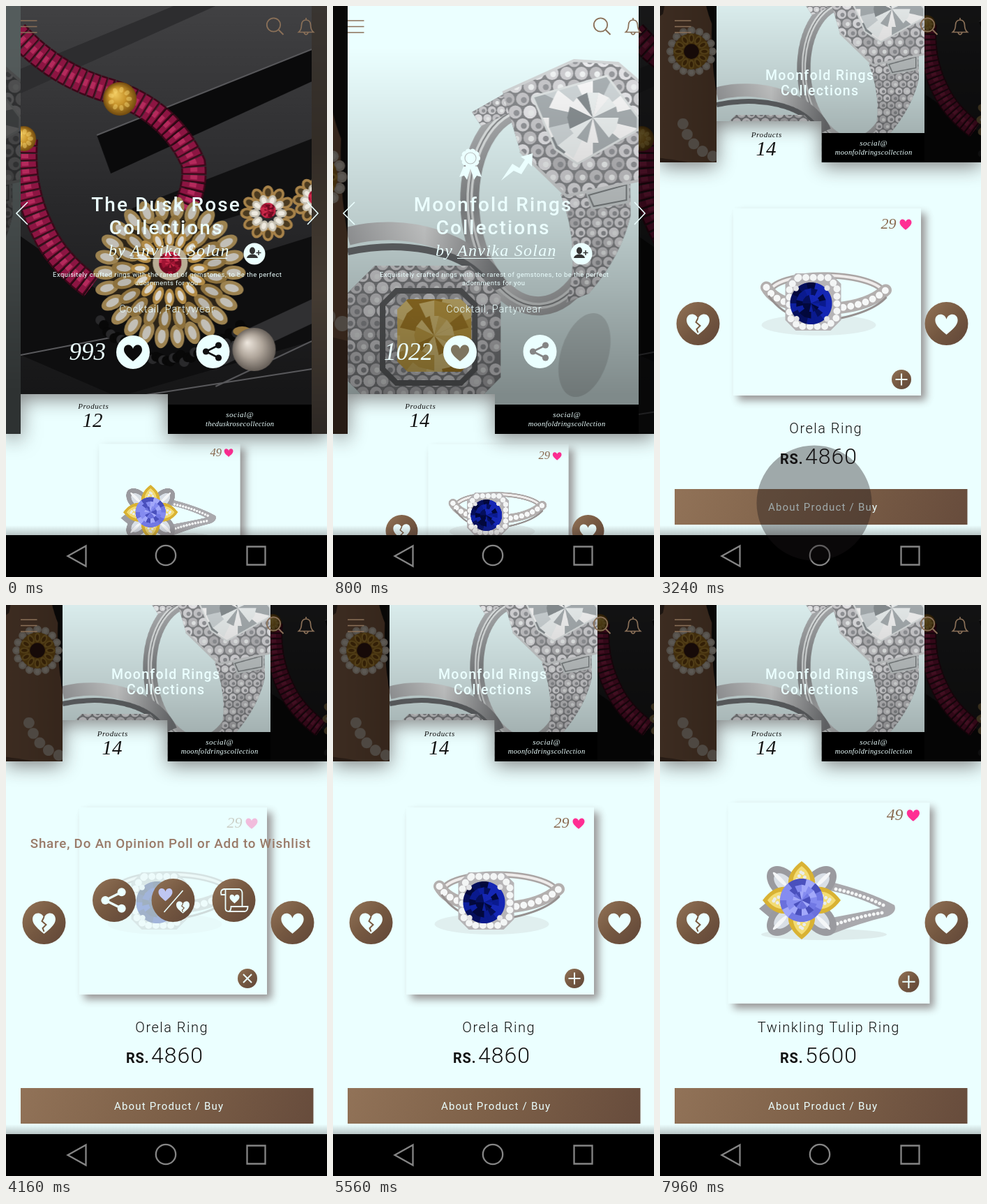
Recreate the animation shown at these times as an HTML page with a canvas. Size 460 by 818 pixels, loop 8 s.

```html
<!DOCTYPE html>
<html lang="en">
<head>
<meta charset="utf-8">
<title>Jewellery app</title>
<style>
html, body { margin: 0; width: 100%; height: 100%; overflow: hidden; background: #ebffff; }
canvas { display: block; width: 100vw; height: 100vh; }
</style>
</head>
<body>
<canvas id="stage"></canvas>
<script>
const W = 460, H = 818, LOOP = 8000, TAU = Math.PI * 2;
const MINT = '#ebffff', PINK = '#ff2e93', BROWN = '#8a7058';
const dpr = window.devicePixelRatio || 1;
const stage = document.getElementById('stage');
stage.width = W * dpr;
stage.height = H * dpr;
const screen2d = stage.getContext('2d');
let g = screen2d;

const clamp = x => Math.max(0, Math.min(1, x));
const lerp = (a, b, k) => a + (b - a) * k;
const prog = (t, a, b) => clamp((t - a) / (b - a));
const ease = x => x * x * (3 - 2 * x);
const span = (t, a, b) => ease(prog(t, a, b));
const hash = n => { const s = Math.sin(n * 127.1) * 43758.5; return s - Math.floor(s); };
const sans = (size, weight = 400) => `${weight} ${size}px Roboto, sans-serif`;
const serif = size => `italic ${size}px "Liberation Serif", serif`;

// ---- drawing helpers ----
function group(alpha, fn) {
  if (alpha <= 0.003) return;
  g.save();
  g.globalAlpha *= alpha;
  fn();
  g.restore();
}
function text(s, x, y, font, color, gap = 0, align = 'center') {
  g.font = font;
  g.fillStyle = color;
  g.letterSpacing = gap + 'px';
  g.textAlign = align;
  g.fillText(s, x + (align === 'center' ? gap / 2 : 0), y);
}
function disc(x, y, r, fill) {
  g.fillStyle = fill;
  g.beginPath();
  g.arc(x, y, r, 0, TAU);
  g.fill();
}
function oval(x, y, rx, ry, fill, rot = 0) {
  g.fillStyle = fill;
  g.beginPath();
  g.ellipse(x, y, rx, ry, rot, 0, TAU);
  g.fill();
}
function shade(x0, y0, x1, y1, ...colors) {
  const s = g.createLinearGradient(x0, y0, x1, y1);
  colors.forEach((c, i) => s.addColorStop(i / (colors.length - 1), c));
  return s;
}
function glow(x, y, r, ...colors) {
  const s = g.createRadialGradient(x - r * .3, y - r * .3, 0, x, y, r);
  colors.forEach((c, i) => s.addColorStop(i / (colors.length - 1), c));
  return s;
}
function fill(path, color) {
  g.fillStyle = color;
  g.fill(typeof path === 'string' ? new Path2D(path) : path);
}
function line(path, width, color, dash = [], cap = 'butt') {
  g.lineWidth = width;
  g.strokeStyle = color;
  g.lineCap = cap;
  g.setLineDash(dash);
  g.stroke(typeof path === 'string' ? new Path2D(path) : path);
  g.setLineDash([]);
}
const dots = (path, size, gap, color) => line(path, size, color, [0, gap], 'round');
function chamfer(x, y, rx, ry, c) {
  return new Path2D(`M${x - rx + c} ${y - ry}H${x + rx - c}L${x + rx} ${y - ry + c}V${y + ry - c}` +
    `L${x + rx - c} ${y + ry}H${x - rx + c}L${x - rx} ${y + ry - c}V${y - ry + c}Z`);
}
// small round stones filling a shape
function pave(path, x0, y0, x1, y1, step) {
  g.save();
  fill(path, '#8b8d90');
  g.clip(typeof path === 'string' ? new Path2D(path) : path);
  let row = 0;
  for (let y = y0; y < y1; y += step * .88, row++)
    for (let x = x0 + (row % 2) * step / 2; x < x1; x += step) {
      const v = 190 + hash(x * 3 + y * 7) * 50 | 0;
      disc(x, y, step * .45, `rgb(${v},${v},${v + 3})`);
      disc(x + step * .08, y + step * .06, step * .2, hash(x + y) > .5 ? '#9b9da1' : '#f5f8f8');
    }
  g.restore();
}
// faceted stone: hashed wedges clipped to a shape
function gem(path, x, y, r, colors) {
  g.save();
  fill(path, colors[0]);
  g.clip(path);
  for (let ring = 0; ring < 3; ring++) {
    const rr = r * (1 - ring * .3);
    for (let i = 0; i < 14; i++) {
      const a = (i + ring * .5) * TAU / 14;
      g.fillStyle = colors[hash(i * 3 + ring * 17 + r) * colors.length | 0];
      g.beginPath();
      g.moveTo(x, y);
      g.lineTo(x + Math.cos(a) * rr, y + Math.sin(a) * rr);
      g.lineTo(x + Math.cos(a + .46) * rr, y + Math.sin(a + .46) * rr);
      g.fill();
    }
  }
  g.restore();
}
function round(x, y, r) {
  const p = new Path2D();
  p.arc(x, y, r, 0, TAU);
  return p;
}
function petals(x, y, n, dist, len, wide, color, core, turn = 0) {
  for (let i = 0; i < n; i++) {
    g.save();
    g.translate(x, y);
    g.rotate(turn + i * TAU / n);
    oval(dist, 0, len, wide, color);
    if (core) oval(dist, 0, len * .6, wide * .55, core);
    g.restore();
  }
}
function sprite(w, h, k, x, y, paint) {
  const c = document.createElement('canvas');
  c.width = w * k;
  c.height = h * k;
  g = c.getContext('2d');
  g.scale(k, k);
  g.translate(-x, -y);
  paint();
  g = screen2d;
  return c;
}

// ---- slide pictures ----
function earPicture() {
  g.fillStyle = shade(21, 0, 438, 0, '#a9805f', '#b98a69', '#94694c');
  g.fillRect(21, 0, 417, 614);
  fill('M405 0H438V330Q425 260 428 190Q400 120 405 0Z', '#191513');
  fill('M300 0H400Q350 60 330 170L300 190Z', '#4d3a2e');
  fill('M21 470Q250 430 438 480V614H21Z', '#6d4c38');
  petals(387, 245, 16, 42, 8, 8, '#e9dccb', '#fff6e6');
  disc(387, 245, 36, '#b57d21');
  petals(387, 245, 12, 26, 10, 6, '#dfa93f', '#8c5714');
  disc(387, 245, 15, '#3c1c17');
  dots('M370 390Q385 440 430 455', 22, 23, '#d8c8b8');
}
function eternityPicture() {
  g.fillStyle = MINT;
  g.fillRect(21, 0, 417, 614);
  oval(360, 500, 34, 62, 'rgba(120,120,120,.25)', .3);
  const hoop = new Path2D();
  hoop.ellipse(287, 288, 91, 142, -.08, 0, TAU);
  line(hoop, 27, shade(180, 150, 380, 440, '#c5c7c9', '#8e9193', '#d9dbdc', '#9c9ea0'));
  line(hoop, 9, '#e8ecec');
  line(hoop, 2, '#8e9193');
  pave('M199 152L262 116L285 138L212 172Z', 195, 115, 290, 175, 13);
  pave('M326 270L425 236L426 300Q412 360 366 412L334 425Q356 350 326 270Z', 322, 240, 430, 430, 16);
  fill('M362 268L424 250V282L370 292Z', '#cfd5d6');
  line('M366 271L420 256V278L373 287Z', 2, '#7f8486');
  pave('M243 124L345 78L408 82L438 108V250L334 272L268 208Z', 240, 78, 440, 275, 21);
  line('M243 124L345 78L408 82L438 108M268 208L334 272L438 250', 4, '#d6d9da');
  const stone = new Path2D('M286 130L392 100L446 172L350 226L318 205Z');
  gem(stone, 372, 160, 92, ['#f4f9f9', '#d5dcde', '#aeb5b8', '#ffffff', '#8d9497']);
  line(stone, 3, '#e5eaea');
  line('M21 330C100 308 205 335 238 405', 26, shade(21, 0, 240, 0, '#b4b6b8', '#eceeee', '#85878a'));
  line('M21 352C100 335 180 350 215 390', 10, '#707376');
  pave(chamfer(128, 474, 112, 102, 44), 14, 370, 242, 580, 19);
  line(chamfer(137, 474, 66, 66, 20), 8, '#66686a');
  gem(chamfer(145, 472, 53, 52, 15), 145, 472, 72, ['#d7b04c', '#f0d583', '#b78b2c', '#e3c266']);
  g.fillStyle = shade(0, 60, 0, 556, 'rgba(0,0,0,0)', 'rgba(0,0,0,.2)', 'rgba(0,0,0,.46)');
  g.fillRect(21, 0, 417, 614);
}
function rubyPicture() {
  g.fillStyle = shade(0, 0, 0, 560, '#414143', '#29292b', '#161617');
  g.fillRect(21, 0, 417, 614);
  fill('M130 185L438 62V108L150 240Z', '#0a0a0b');
  fill('M21 90L240 0H300L21 125Z', '#2d2d2f');
  fill('M180 290L438 190V268L200 340Z', '#101011');
  fill('M21 330L150 420L438 330V480L160 560L21 500Z', '#0e0e0f');
  fill('M330 470L438 420V455L300 520Z', '#303032');
  line('M130 185L438 62M21 500L150 475M300 545L438 480M21 585L438 520', 2, '#59595c');
  const strands = 'M14 38Q70 100 150 122Q235 150 268 225Q275 275 232 325M28 190Q22 260 52 320Q72 365 122 402';
  line(strands, 36, '#3d0719', [10, 1]);
  line(strands, 31, '#8c1542', [8, 3]);
  line(strands, 10, '#b52a5c', [6, 5]);
  for (const [x, y, r] of [[163, 133, 24], [25, 190, 18]]) {
    disc(x, y, r, glow(x, y, r, '#f3cd62', '#c8942c', '#714a0e'));
    petals(x, y, 9, r * .55, 4, 3, 'rgba(250,220,120,.45)');
  }
  for (let i = 0; i < 42; i++)
    disc(135 + i * 5, 450 + Math.sin(i * .075) * 50 + hash(i) * 12, 7, i % 3 ? '#080808' : '#29292b');
  disc(234, 382, 92, '#2c2418');
  petals(234, 382, 26, 92, 17, 10, '#9c8250', '#c2bfb7');
  petals(234, 382, 20, 66, 17, 9, '#8d713d', '#b9b6ae', .1);
  petals(234, 376, 16, 42, 13, 7, '#b18a45', '#d9d6cf');
  disc(235, 368, 25, '#b9ad94');
  gem(round(235, 368, 16), 235, 368, 18, ['#a01433', '#c92a4a', '#730b22']);
  for (const [x, y, r] of [[375, 297, 1], [444, 278, .8]]) {
    petals(x, y, 12, 30 * r, 10, 8, '#a8834a', '#4a3a20');
    petals(x, y, 10, 19 * r, 8, 6, '#c7c1b2', '#eeeae0');
    gem(round(x, y - 4, 11), x, y - 4, 13, ['#9e1231', '#c92a4a', '#6f0a20']);
  }
  oval(338, 466, 13, 7, '#9a7a40');
  disc(355, 492, 31, glow(355, 492, 33, '#efe8df', '#b1a79c', '#5d5650'));
}
function lastPicture() {
  g.fillStyle = shade(21, 0, 21, 614, '#a09488', '#8d7a69', '#c0a68d', '#7d6f64');
  g.fillRect(21, 0, 417, 614);
}
const slides = [earPicture, eternityPicture, rubyPicture, lastPicture]
  .map(p => sprite(417, 614, 1, 21, 0, p));

// ---- rings, in the coordinates of the open card ----
function blueRing() {
  oval(228, 458, 82, 15, 'rgba(130,100,100,.10)');
  const back = new Path2D();
  back.ellipse(240, 413, 82, 26, .02, Math.PI, TAU);
  line(back, 9, '#aaa5a4');
  line(back, 4, '#efeceb');
  const arms = 'M153 404Q163 422 190 428M252 434Q300 430 324 408';
  line(arms, 17, '#b3afae', [], 'round');
  dots(arms, 10, 11, '#f6f8f8');
  line('M156 416Q175 442 200 447M250 450Q305 440 325 418', 3, '#96908f');
  fill(chamfer(220, 425, 40, 41, 15), '#b6b4b6');
  dots(chamfer(220, 425, 34, 35, 13), 10, 10.6, '#f3f5f5');
  gem(round(217, 427, 30), 217, 427, 31, ['#0a1a8e', '#1527b5', '#050f5c', '#0d1f9f', '#02083c']);
  for (const a of [.8, 2.35, 3.9, 5.5]) disc(218 + Math.cos(a) * 31, 427 + Math.sin(a) * 31, 4, '#e4e4e6');
}
function lotusRing() {
  oval(235, 472, 90, 8, 'rgba(130,100,100,.12)');
  fill('M238 395Q300 410 336 430Q340 440 326 446Q285 456 245 472L235 450Q290 440 316 434Q280 416 238 408Z', '#a9a9ad');
  dots('M252 407Q290 415 322 431M318 441Q285 446 250 458', 5, 6, '#f4f6f6');
  fill('M160 420L142 435L166 455Z', '#9d9da2');
  petals(203, 424, 4, 36, 29, 19, '#9a9a9f', '#d9dfe6', Math.PI / 4);
  petals(203, 424, 4, 44, 14, 3, '#f4f6f8', '', Math.PI / 4);
  for (let i = 0; i < 4; i++) {
    g.save();
    g.translate(203, 423);
    g.rotate(i * TAU / 4);
    fill('M56 0Q38 -24 16 -18V18Q38 24 56 0Z', '#d9b233');
    fill('M49 0Q38 -15 20 -12V12Q38 15 49 0Z', '#f3dc74');
    dots('M24 -9L42 0L24 9', 5, 6, '#e9ecec');
    g.restore();
  }
  gem(round(203, 423, 31), 203, 423, 32, ['#6a70dc', '#858cf0', '#4a50bd', '#7178e4', '#a2a8fa']);
}
const blue = { ring: sprite(270, 270, 2, 105, 290, blueRing), count: '29', dy: 0, name: 'Orela Ring', price: '4860', nameX: 237 };
const lotus = { ring: sprite(290, 290, 2, 97, 282, lotusRing), count: '49', dy: -6, name: 'Twinkling Tulip Ring', price: '5600', nameX: 241 };

// ---- icons ----
function heartPath(x, y, w) {
  const h = w / 2, p = new Path2D();
  p.moveTo(x, y + h * .92);
  p.bezierCurveTo(x - h * .5, y + h * .5, x - h, y + h * .1, x - h, y - h * .35);
  p.bezierCurveTo(x - h, y - h * 1.05, x - h * .15, y - h * 1.05, x, y - h * .45);
  p.bezierCurveTo(x + h * .15, y - h * 1.05, x + h, y - h * 1.05, x + h, y - h * .35);
  p.bezierCurveTo(x + h, y + h * .1, x + h * .5, y + h * .5, x, y + h * .92);
  return p;
}
function crackedHeart(x, y, w) {
  const k = w / 33;
  fill(heartPath(x, y, w), MINT);
  line(`M${x} ${y - 9 * k}l${-3 * k} ${6 * k}l${6 * k} ${5 * k}l${-5 * k} ${5 * k}l${2 * k} ${5 * k}`, 2 * k, '#78593f');
}
const brownDisc = (x, y, r) => disc(x, y, r, shade(x - r, y - r, x + r, y + r, '#927357', '#755841', '#604638'));
function share(x, y, k, color) {
  g.save();
  g.translate(x, y);
  g.scale(k, k);
  line('M9 -9L-9 0L9 9', 2.6, color);
  disc(-9, 0, 4.6, color);
  disc(9, -9, 4.6, color);
  disc(9, 9, 4.6, color);
  g.restore();
}
function topIcons() {
  line('M21 21H44.500M21 29.500H44.500M21 38H44.500', 1.7, BROWN);
  line(round(383.5, 27, 9.7), 1.8, BROWN);
  line('M390.500 34L397.500 41', 2, BROWN);
  line('M419.500 37.500H440.500Q436.500 34 436.500 27Q436 20 430 20Q424 20 423.500 27Q423.500 34 419.500 37.500ZM427 38Q430 44 433 38M430 17V20', 1.7, BROWN);
}
function navBar() {
  g.fillStyle = shade(0, 744, 0, 758, 'rgba(60,50,50,0)', 'rgba(60,50,50,.28)');
  g.fillRect(0, 744, W, 14);
  g.fillStyle = '#000';
  g.fillRect(0, 758, W, 60);
  line('M88.500 788L114.500 773.500V802.500Z', 2.3, '#858585');
  line(round(229, 787, 14.2), 2.3, '#858585');
  line('M345.500 774.500H371.500V800.500H345.500Z', 2.3, '#858585');
}

// ---- hero ----
const info = {
  1: { title: 'Moonfold Rings', likes: '1022', count: '14', tag: 'moonfoldringscollection', hole: '#7d745f', node: '#858585' },
  2: { title: 'The Dusk Rose', likes: '993', count: '12', tag: 'theduskrosecollection', hole: '#0c0c0d', node: '#101012' }
};
function heroDetails(d, awards) {
  if (awards) {
    petals(197, 218, 10, 10, 4, 4, MINT);
    disc(197, 218, 11, MINT);
    line(round(197, 218, 8), 1.2, '#b9bfbf');
    fill('M187 230L181 245L188 243L192 249L197 233L202 249L206 243L213 245L207 230Z', MINT);
    fill('M241 250L257 226L267 232L275 220L269 216L286 211L285 230L280 225L270 241L259 236Z', MINT);
  }
  text('by', 147, 358, serif(24), MINT, 1.2, 'left');
  text('Anvika Solan', 178, 358, serif(24), MINT, 1.3, 'left');
  line('M178 361.500H317', 1, MINT);
  disc(356, 355, 15.5, MINT);
  oval(353, 350.5, 4, 5, '#333');
  fill('M345 361Q346 356 353 355.500Q360 356 361 361Z', '#333');
  line('M362 350V357M358.500 353.500H365.500', 1.5, '#333');
  text('Exquisitely crafted rings with the rarest of gemstones, to be the perfect', 231, 388, sans(9.5), MINT, .42);
  text('adornments for you', 230, 400, sans(9.5), MINT, .42);
  text('Cocktail, Partywear', 230.5, 439, sans(14.5, 300), MINT, .8);
  text(d.likes, 143, 507, serif(35), MINT, 0, 'right');
  disc(182, 496, 24, MINT);
  fill(heartPath(182, 497, 26), d.hole);
  disc(296.5, 495, 24, MINT);
  share(295.5, 495, 1, d.node);
}
function hero(pos, q) {
  const x = lerp(21, 81, q), w = lerp(417, 298, q), k = w / 417;
  const bottom = lerp(613, 224, q), top = lerp(0, -110, q);
  const split = x + w * .506, tab = lerp(57, 59, q);
  const shape = new Path2D();
  shape.rect(0, 0, W, bottom - tab);
  shape.rect(0, bottom - tab, x, tab);
  shape.rect(split, bottom - tab, W - split, tab);
  g.save();
  g.shadowColor = 'rgba(40,25,25,.55)';
  g.shadowBlur = 28 * dpr;
  g.shadowOffsetY = 6 * dpr;
  fill(shape, '#000');
  g.restore();
  g.save();
  g.clip(shape);
  slides.forEach((s, i) => {
    const sx = x + w * (i - pos);
    g.drawImage(s, sx, top, w + .5, 614 * k);
    g.fillStyle = `rgba(0,0,0,${.64 * clamp(Math.abs(i - pos))})`;
    g.fillRect(sx, 0, w + .5, bottom);
  });
  g.fillStyle = '#000';
  g.fillRect(split, bottom - 42, x + w - split, 42);
  g.restore();

  for (const i of [1, 2]) {
    const d = info[i], near = clamp(1 - Math.abs(i - pos) * 1.4);
    group(near, () => {
      const rx = lerp(335, 306, q);
      text(d.count, lerp(124, 152, q), bottom - 10, serif(29), '#111');
      text('social@', rx, bottom - 24, serif(11), MINT, .5);
      text(d.tag, rx, bottom - 11, serif(10.5), MINT, .35);
      g.translate(w * (i - pos), 0);
      const size = lerp(28, 19.5, q), gap = lerp(2.1, 1.3, q);
      text(d.title, 228.500, lerp(294, 106, q), sans(size, 500), MINT, gap);
      text('Collections', 228.500, lerp(327, 128, q), sans(size, 500), MINT, gap);
      group(clamp(1 - q * 2), () => heroDetails(d, i === 1));
    });
  }
  text('Products', lerp(125, 152.5, q), bottom - 36, serif(11), '#111', .6);
  group(1 - q, () => line('M31 281L15 297L31 313M432 281L447 297L432 313', 1.6, MINT));
}

// ---- product card ----
function card(p, x, y, size, alpha, veil = 0, angle = 0) {
  group(alpha, () => {
    g.translate(x, y);
    g.rotate(angle);
    g.scale(size / 270, size / 270);
    g.save();
    g.shadowColor = 'rgba(70,45,45,.5)';
    g.shadowBlur = 11 * dpr;
    g.shadowOffsetX = g.shadowOffsetY = 7 * dpr;
    g.fillStyle = MINT;
    g.fillRect(-134.5, -134, 269, 268);
    g.restore();
    g.drawImage(p.ring, -135, -135, 270, 270);
    text(p.count, 99, -105 + p.dy, serif(22), '#8a6a50', 0, 'right');
    fill(heartPath(112.5, -111 + p.dy, 17), PINK);
    g.fillStyle = `rgba(235,255,255,${.68 * veil})`;
    g.fillRect(-134.5, -134, 269, 268);
    g.translate(106.5, 111 + p.dy);
    brownDisc(0, 0, 14);
    g.rotate(veil * Math.PI / 4);
    line('M-8.500 0H8.500M0 -8.500V8.500', 2, MINT);
  });
}
function sideButtons(q, alpha, pink) {
  group(alpha, () => {
    const y = lerp(752, 455, q), r = lerp(23, 31, q);
    const lx = lerp(98.5, 54.5, q), rx = lerp(365.5, 410.5, q);
    brownDisc(lx, y, r);
    crackedHeart(lx, y + 1, r * 1.06);
    group(pink, () => {
      g.shadowColor = PINK;
      g.shadowBlur = 16 * dpr;
      disc(rx, y, r + 5, PINK);
    });
    brownDisc(rx, y, r);
    fill(heartPath(rx, y + 1, r * 1.04), MINT);
  });
}
function productInfo(q, first, second) {
  group(q, () => {
    g.translate(0, (1 - q) * 240);
    for (const [p, a] of [[blue, first], [lotus, second]])
      group(a, () => {
        text(p.name, p.nameX, 612, sans(20, 300), '#111', 1.5);
        text(p.price, 208, 656, sans(32, 300), '#111', 1, 'left');
      });
    text('RS.', 172, 656, sans(20, 700), '#111', .8, 'left');
    g.fillStyle = shade(21, 640, 440, 795, '#937459', '#7d6048', '#654a3b');
    g.fillRect(21, 692, 419.5, 51);
    text('About Product / Buy', 233, 723, sans(15), MINT, 1.2);
  });
}
function pollMenu(o) {
  group(o, () => text('Share, Do An Opinion Poll or Add to Wishlist', 235.5, 348, sans(18.8, 500), '#997a68', .8));
  [155, 239.5, 326.5].forEach((x, i) => {
    const k = ease(clamp(o * 1.4 - i * .2));
    group(k, () => {
      g.translate(x, 423);
      g.scale(k, k);
      brownDisc(0, 0, 31);
      if (i === 0) share(-1, 0, 1.3, MINT);
      if (i === 1) {
        fill(heartPath(-11, -8, 20), '#bfc6f2');
        crackedHeart(14, 10, 19);
        line('M-13 17L14 -14', 1.6, MINT);
      }
      if (i === 2) {
        line('M-12 -8H-18Q-20 -15 -14 -16H8Q12 -15 12 -10V9M-12 -15V12Q-12 16 -7 16H16Q20 15 20 9H-4Q-4 16 -8 16', 1.8, MINT);
        fill(heartPath(1, -2, 14), MINT);
      }
    });
  });
}
function touch(x, y, r, alpha) {
  group(alpha, () => disc(x, y, r, '#1c181a'));
}
function ripple(t, start, length, x, y, size, peak) {
  const u = prog(t, start, start + length);
  if (u > 0 && u < 1) touch(x, y, size * (1 - (1 - u) ** 4), peak * (1 - u ** 3));
}

function draw(t) {
  g.setTransform(dpr, 0, 0, dpr, 0, 0);
  g.fillStyle = MINT;
  g.fillRect(0, 0, W, H);

  const pos = 2 - span(t, 0, 800);
  const q = span(t, 2840, 3220);
  const menu = span(t, 3680, 4140) - span(t, 4960, 5540);
  const dx = 417 * prog(t, 6560, 7280) ** 1.6;
  const next = span(t, 6480, 6800);

  card(lotus, 234.5, 728, 203, clamp((pos - 1) * 2 - 1));
  card(lotus, 242, 427, lerp(255, 290, next), next);
  productInfo(q, 1 - span(t, 6480, 6760), span(t, 7320, 7920));
  card(blue, lerp(237, 239.5, q) + dx, lerp(728, 424, q), lerp(202, 270, q),
    t < 7280 ? clamp(1 - (pos - 1) * 2) : 0, menu, dx / 92 * Math.PI / 18);
  sideButtons(q, clamp(1 - (pos - 1) * 2), span(t, 6620, 6840) * (1 - span(t, 6960, 7280)));
  pollMenu(menu);
  hero(pos, q);
  navBar();
  topIcons();

  ripple(t, 2840, 800, 221, 712, 88, .42);
  ripple(t, 3680, 440, 346, 535, 60, .4);
  ripple(t, 4360, 440, 346, 535, 60, .4);
  touch(250 + dx, 443, 74, .48 * span(t, 6480, 6640) * (1 - span(t, 6860, 7120)));
}

function frame(now) {
  draw(now % LOOP);
  requestAnimationFrame(frame);
}
requestAnimationFrame(frame);
</script>
</body>
</html>
```
